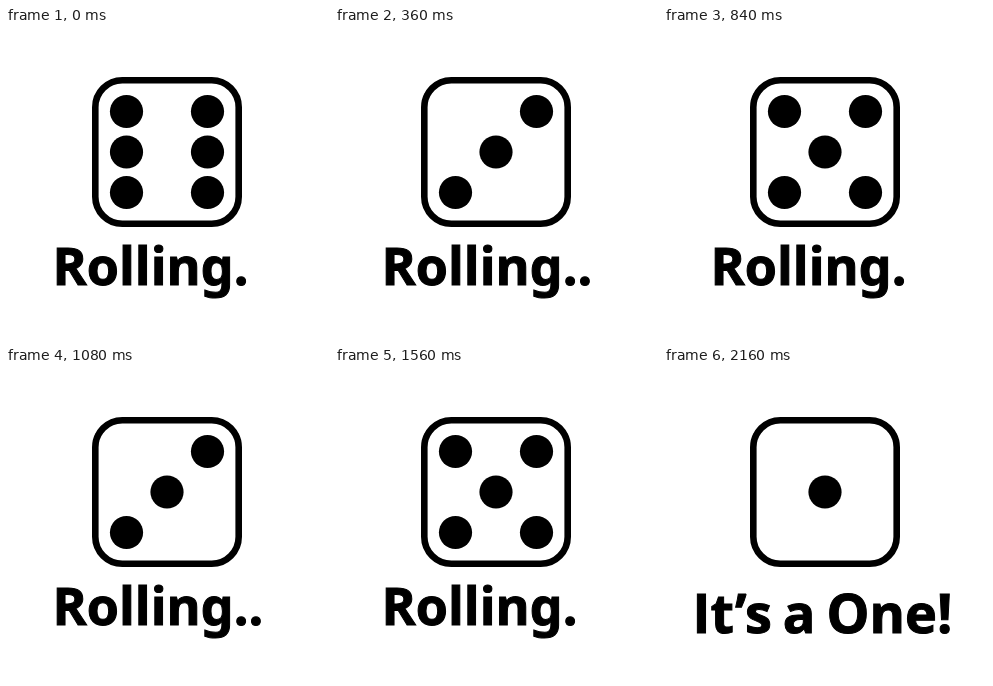
Animation, 323 px wide and 312 px high, one loop 5.66 s. Source, as an HTML page:

```html
<!DOCTYPE html>
<html lang="en">
<head>
<meta charset="utf-8">
<title>Dice roll</title>
<style>
  html, body { margin: 0; width: 100%; height: 100%; overflow: hidden; background: #fff; }
  svg { display: block; width: 323px; height: 312px; }
  text { stroke: #000; stroke-width: 1px; }
  #rolling { font: bold 52px "Noto Sans", sans-serif; }
  #result { font: bold 54px "Open Sans", sans-serif; word-spacing: -3px; }
</style>
</head>
<body>
<svg viewBox="0 0 323 312">
  <rect x="89.3" y="52.3" width="143.4" height="143.4" rx="27" fill="#fff" stroke="#000" stroke-width="6.6"/>
  <g id="pips"></g>
  <text id="rolling" x="46.5" y="257"></text>
  <text id="result" x="28.5" y="264.5">It’s a One!</text>
</svg>
<script>
const STEP = 120, LOOP = 5660, ROLL_STEPS = 18;
const CENTER_X = 161, CENTER_Y = 124, SPACING = 40.5, RADIUS = 16.6;

const byId = id => document.getElementById(id);

function pip(column, row) {
  const x = CENTER_X + column * SPACING, y = CENTER_Y + row * SPACING;
  return `<circle cx="${x}" cy="${y}" r="${RADIUS}"/>`;
}

// Opposite pips come in pairs as the face grows; odd faces add the middle one
function drawFace(face) {
  let dots = face % 2 ? pip(0, 0) : '';
  for (const side of [-1, 1]) {
    if (face >= 2) dots += pip(side, -side);
    if (face >= 4) dots += pip(side, side);
    if (face === 6) dots += pip(side, 0);
  }
  byId('pips').innerHTML = dots;
}

let shown = -1;
function render(time) {
  const step = Math.min(ROLL_STEPS, Math.floor(time % LOOP / STEP));
  if (step === shown) return;
  shown = step;

  const done = step === ROLL_STEPS;
  const turn = step % 6;
  drawFace(done ? 1 : 6 - turn);
  byId('rolling').textContent = 'Rolling' + '.'.repeat(1 + Math.floor(turn / 2));
  byId('rolling').style.display = done ? 'none' : '';
  byId('result').style.display = done ? '' : 'none';
}

const start = performance.now();
function tick() {
  render(performance.now() - start);
  requestAnimationFrame(tick);
}
tick();
</script>
</body>
</html>
```
